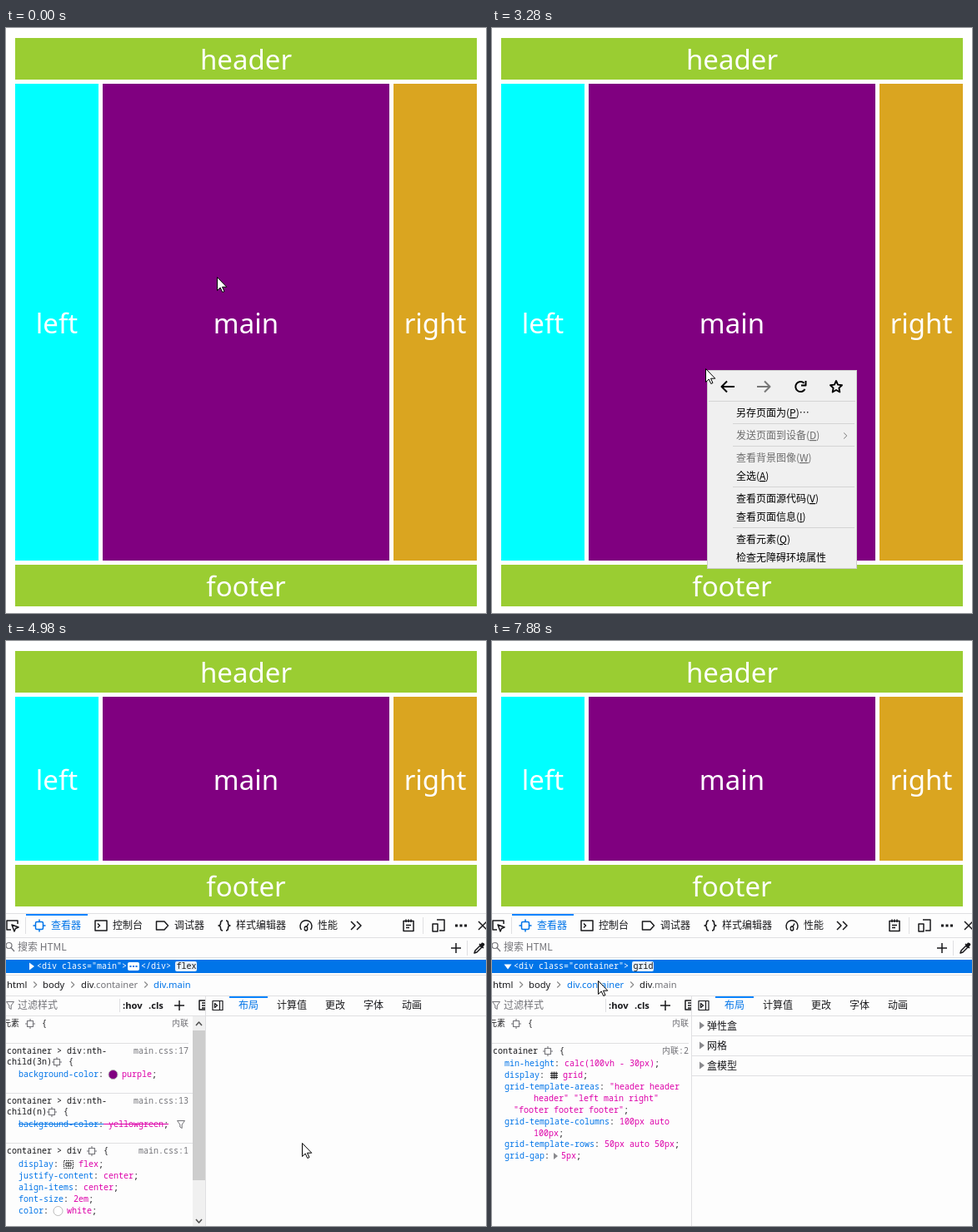
Write an HTML page that moves like this. It is 576 px wide and 703 px high and loops after 8 s.

```html
<!DOCTYPE html>
<html lang="zh-CN">
<head>
<meta charset="utf-8">
<title>Grid layout inspector</title>
<style>
html, body { margin: 0; width: 100%; height: 100%; overflow: hidden; background: #fff; }
svg { display: block; width: 100%; height: 100%; }
text { white-space: pre; font-family: "Noto Sans", "Noto Sans CJK SC", sans-serif; }
.big { font-size: 33px; fill: #fff; text-anchor: middle; }
.ui { font: 12px "Noto Sans CJK SC", "Noto Sans CJK", sans-serif; }
.sm { font-size: 11.2px; }
.mono { font: 10px "Noto Sans Mono", "Noto Sans CJK SC", monospace; }
.icon { fill: none; stroke-width: 1.5; stroke-linejoin: round; }
</style>
</head>
<body>
<svg id="stage" viewBox="0 0 576 703"></svg>
<script>
const INK = '#18181b', GREY = '#737378', BLUE = '#0074e8', PINK = '#dd00a9', EDGE = '#e0e0e2';
const LOOP = 8000, STEP = 120;

const rect = (x, y, w, h, fill, more = '') =>
  `<rect x="${x}" y="${y}" width="${w}" height="${h}" fill="${fill}" ${more}/>`;
const hline = (x, y, w, c = EDGE) => rect(x, y, w, 1, c);
const vline = (x, y, h, c = EDGE) => rect(x, y, 1, h, c);
const esc = s => s.replace(/&/g, '&amp;').replace(/</g, '&lt;').replace(/>/g, '&gt;');
const text = (x, y, s, cls = 'ui', fill = INK, more = '') =>
  `<text x="${x}" y="${y}" class="${cls}" fill="${fill}" ${more}>${esc(s)}</text>`;
const icon = (x, y, d, c = INK, more = '') =>
  `<path class="icon" transform="translate(${x} ${y})" d="${d}" stroke="${c}" ${more}/>`;
const solid = (x, y, d, c) => `<path transform="translate(${x} ${y})" d="${d}" fill="${c}"/>`;
const group = (id, body) => `<g id="${id}">${body}</g>`;

const PLUS = 'M-6 0H6M0-6V6';
const FUNNEL = 'M-4.5-4.5H4.5L1.2 0V4.5L-1.2 3V0Z';
const CHEVRON = 'M-1.8-3.5L1.8 0L-1.8 3.5';
const TARGET = 'M-3.5-3.5H3.5V3.5H-3.5ZM0-6V-3.5M0 3.5V6M-6 0H-3.5M3.5 0H6';
const RIGHT = 'M0-4.5L6 0L0 4.5Z', DOWN = 'M-4.5-2.5H4.5L0 3.5Z';
const INSPECT = 'M-3-4.5H3Q4.5-4.5 4.5-3V3Q4.5 4.5 3 4.5H-3Q-4.5 4.5-4.5 3V-3Q-4.5-4.5-3-4.5ZM0-7.5V-4.5M0 4.5V7.5M-7.5 0H-4.5M4.5 0H7.5';

// Grid page, fitted to a viewport of the given height
function page(height) {
  const mid = height - 130, bottom = height - 58;
  const cell = (x, y, w, h, fill, s) =>
    rect(x, y, w, h, fill) + text(x + w / 2, Math.round(y + h / 2 + 13), s, 'big', '#fff');
  return cell(11, 12, 554, 50, 'yellowgreen', 'header') +
    cell(11, 67, 100, mid, 'cyan', 'left') +
    cell(116, 67, 344, mid, 'purple', 'main') +
    cell(465, 67, 100, mid, 'goldenrod', 'right') +
    cell(11, bottom, 554, 50, 'yellowgreen', 'footer');
}

// Context menu: label, access key, row centre, disabled
const ITEMS = [
  ['另存页面为', 'P', 463], ['发送页面到设备', 'D', 490, 1], ['查看背景图像', 'W', 517, 1],
  ['全选', 'A', 539], ['查看页面源代码', 'V', 566], ['查看页面信息', 'I', 588],
  ['查看元素', 'Q', 615], ['检查无障碍环境属性', '', 637]
];

function menu() {
  const label = ([s, key, y, off], i) =>
    `<text x="293" y="${y + 4}" class="ui" fill="${off ? '#6d6d6d' : '#000'}">${s}` +
    (key ? `(<tspan text-decoration="underline">${key}</tspan>)` : '') + (i ? '' : '…') + '</text>';
  return rect(258.5, 411.5, 179, 238, '#f0f0f0', 'stroke="#ccc"') +
    rect(261, 0, 174, 22, '#91c9f7', 'id="hover"') +
    icon(283, 431, 'M8 0H-7M-1-6.5L-7.5 0L-1 6.5', '#000', 'style="stroke-width:2"') +
    icon(326, 431, 'M-8 0H7M1-6.5L7.5 0L1 6.5', '#777', 'style="stroke-width:2"') +
    icon(370, 431, 'M5.5 3A6 6 0 1 1 4.5-4.2M6.5-7V-1.5H1', '#000', 'style="stroke-width:2"') +
    icon(413, 431, 'M0-7L2.1-2.4L7-1.8L3.4 1.6L4.3 6.5L0 4L-4.3 6.5L-3.4 1.6L-7-1.8L-2.1-2.4Z', '#000', 'style="stroke-width:1.9"') +
    hline(260, 448, 176, '#d4d4d4') +
    [475, 502, 551, 600].map(y => hline(289, y, 146, '#d4d4d4')).join('') +
    ITEMS.map(label).join('') + icon(424, 490, CHEVRON, '#777', 'style="stroke-width:1"');
}

function toolbar() {
  return icon(8, 342, 'M-2 5H-7V-6H6V-2M-1-1L7 2L3.5 3.5L2 7Z') +
    vline(23, 332, 20) + rect(24, 328, 74, 2, '#0a84ff') +
    icon(40, 342, INSPECT, BLUE) + text(54, 346, '查看器', 'ui', BLUE) +
    icon(114, 342, 'M-7-6H7V6H-7ZM-4-2.5L-1.5 0L-4 2.5') + text(128, 346, '控制台') +
    icon(187, 342, 'M-6.5-5H3L7.5 0L3 5H-6.5Z') + text(202, 346, '调试器') +
    icon(262, 342, 'M-2-6Q-4.5-6-4.5-3Q-4.5 0-7 0Q-4.5 0-4.5 3Q-4.5 6-2 6M2-6Q4.5-6 4.5-3Q4.5 0 7 0Q4.5 0 4.5 3Q4.5 6 2 6') +
    text(276, 346, '样式编辑器') +
    icon(360, 342, 'M-5.5 5A7 7 0 1 1 5.5 5M-1.5 3.5A1.7 1.7 0 1 0 1.5 3.5A1.7 1.7 0 1 0-1.5 3.5M.5 2L3-2.5') +
    text(374, 346, '性能') +
    icon(420, 342, 'M-6-5L-1 0L-6 5M1-5L6 0L1 5') +
    icon(483, 342, 'M-6-5.5H6V6.5H-6ZM-3-7.5V-4M0-7.5V-4M3-7.5V-4M-3-.5H3M-3 2.5H1') +
    vline(500, 332, 20) +
    icon(519, 342, 'M-2-7H7V6H1M-7-2H-1V7H-7Z') +
    solid(546, 342, 'M-7-1.5h3v3h-3zM-1.5-1.5h3v3h-3zM4-1.5h3v3h-3z', INK) +
    icon(572, 342, 'M-5-5L5 5M5-5L-5 5') + hline(0, 356, 576);
}

function search() {
  return icon(4, 367, 'M-4-1A3.5 3.5 0 1 1 3-1A3.5 3.5 0 1 1-4-1M2 1.5L6 6', GREY, 'style="stroke-width:1.2"') +
    text(14, 372, '搜索 HTML', 'ui', GREY) + icon(540, 369, PLUS) +
    vline(553, 360, 18) + icon(568, 369, 'M-6 6L-5 3L1-3L3-1L-3 5ZM0-5L5 0') +
    solid(568, 369, 'M0-3L3-6.5Q6-7 6.5-4L3 0Z', INK) + hline(0, 380, 576);
}

const badge = (x, s) => rect(x, 385, 26, 12, '#e8f1fc', 'rx="2"') + text(x + 1.5, 394, s, 'mono', INK);

// Selected node row and breadcrumbs
function node(isMain) {
  const row = (x, s) => text(x, 394, s, 'mono', '#fff', 'font-weight="500"');
  const crumb = (x, s, on) => {
    const a = on ? BLUE : INK, b = on ? BLUE : GREY;
    return `<text x="${x}" y="417" class="sm" fill="${a}">div<tspan fill="${b}">${s}</tspan></text>`;
  };
  return rect(0, 383, 576, 16, '#0074e8') + (isMain
    ? solid(28, 391, RIGHT, '#fff') + row(37, '<div class="main">') +
      rect(146, 386, 14, 10, '#fff', 'rx="2"') +
      solid(153, 391, 'M-4.5-1h2v2h-2zM-1-1h2v2h-2zM2.5-1h2v2h-2z', BLUE) +
      row(162, '</div>') + badge(203, 'flex')
    : solid(19, 391, DOWN, '#fff') + row(26, '<div class="container">') + badge(168, 'grid')) +
    hline(0, 401, 576) + text(1, 417, 'html', 'sm') + text(44, 417, 'body', 'sm') +
    [35, 80, 168].map(x => icon(x, 413, CHEVRON, '#888', 'style="stroke-width:1.1"')).join('') +
    crumb(90, '.container', !isMain) + crumb(177, '.main', isMain) + hline(0, 426, 576);
}

function panes() {
  return icon(5, 438, FUNNEL, GREY, 'style="stroke-width:1"') + text(14, 442, '过滤样式', 'ui', GREY) +
    vline(136, 430, 16) + text(140, 442, ':hov', 'sm', INK, 'font-weight="600"') +
    text(171, 442, '.cls', 'sm', INK, 'font-weight="600"') +
    icon(208, 438, PLUS) + icon(236, 438, 'M3-6H-4V5H3M-1-3H3M-1 0H3M-1 3H3') +
    vline(239, 427, 276) + hline(0, 450, 576) +
    icon(254, 438, 'M-6-5.5H6V5.5H-6ZM2.5-5.5V5.5M-3.5-2.5L-.5 0L-3.5 2.5Z', INK, 'style="stroke-width:1.2"') +
    rect(268, 427, 46, 2, '#0a84ff') + text(279, 442, '布局', 'ui', BLUE) +
    text(325, 442, '计算值') + text(383, 442, '更改') + text(429, 442, '字体') + text(475, 442, '动画');
}

function accordion(first) {
  return [first, '网格', '盒模型'].map((s, i) => {
    const y = 462 + 24 * i;
    return solid(249, y, RIGHT, '#8a8a8e') + text(258, y + 5, s) + hline(240, y + 12, 336);
  }).join('');
}

const mono = (x, y, s, c = INK, more) => text(x, y, s, 'mono', c, more);
const open = (x, y) => icon(x, y - 3, TARGET, GREY, 'style="stroke-width:1.1"') + mono(x + 14, y, '{');
const from = (x, y, s) => mono(x, y, s, GREY, 'text-anchor="end"');
const value = (x, y, s) => {
  const end = s.endsWith(';');
  return mono(x, y, end ? s.slice(0, -1) : s, PINK) + (end ? mono(x + 6 * (s.length - 1), y, ';') : '');
};
const decl = (y, prop, val, x = 27 + 6 * prop.length) =>
  mono(15, y, prop, BLUE) + mono(15 + 6 * prop.length, y, ':') + value(x, y, val);
const swatch = (x, y, c) => `<circle cx="${x}" cy="${y}" r="5.5" fill="${c}" stroke="#bbb"/>`;
const inline = x => text(-4, 463, '元素', 'mono') + open(29, 463) + from(x, 463, '内联') + hline(0, 483, x);

function mainRules() {
  return inline(219) +
    mono(1, 496, 'container > div:nth-') + from(219, 496, 'main.css:17') +
    mono(1, 509, 'child(3n)') + open(61, 509) +
    decl(524, 'background-color', 'purple;', 139) + swatch(128.5, 521, 'purple') + hline(0, 543, 224) +
    mono(1, 556, 'container > div:nth-') + from(219, 556, 'main.css:13') +
    mono(1, 569, 'child(n)') + open(55, 569) +
    decl(584, 'background-color', 'yellowgreen;') + hline(15, 580, 180, PINK) + hline(15, 580, 102, BLUE) +
    icon(210, 581, FUNNEL, GREY, 'style="stroke-width:1"') + hline(0, 603, 224) +
    mono(1, 616, 'container > div') + from(219, 616, 'main.css:1') + open(103, 616) +
    decl(632, 'display', 'flex;', 87) +
    icon(75, 629, 'M-5.5-4.5H5.5V4.5H-5.5Z', INK, 'stroke-dasharray="1.5 1" style="stroke-width:1"') +
    icon(75, 629, 'M-3-2H3V2H-3ZM0-2V2', INK, 'style="stroke-width:1"') +
    decl(646, 'justify-content', 'center;') + decl(660, 'align-items', 'center;') +
    decl(674, 'font-size', '2em;') + decl(688, 'color', 'white;', 73) + swatch(62.5, 685, '#fff') +
    rect(224, 451, 15, 252, '#f0f0f0') + rect(224, 468, 15, 180, '#cdcdcd') +
    icon(231.5, 460, 'M-3.5 2L0-2L3.5 2', '#505050') + icon(231.5, 697, 'M-3.5-2L0 2L3.5-2', '#505050');
}

function containerRules() {
  return inline(236) +
    mono(1, 496, 'container') + open(67, 496) + from(236, 496, '内联:2') +
    decl(511, 'min-height', 'calc(100vh - 30px);') + decl(525, 'display', 'grid;', 85) +
    icon(74.5, 522, 'M-2.5-4.5V4.5M0-4.5V4.5M2.5-4.5V4.5M-4.5-2.5H4.5M-4.5 0H4.5M-4.5 2.5H4.5', INK, 'style="stroke-width:1"') +
    decl(539, 'grid-template-areas', '"header header') +
    value(50, 553, 'header" "left main right"') + value(26, 567, '"footer footer footer";') +
    decl(581, 'grid-template-columns', '100px auto') + value(50, 595, '100px;') +
    decl(608, 'grid-template-rows', '50px auto 50px;') +
    decl(622, 'grid-gap', '5px;', 83) + solid(74, 619, 'M0-4L5 0L0 4Z', '#8a8a8e');
}

function highlight() {
  const guides = '<path d="M10.5 0V327M564.5 0V327M0 11.5H576M0 316.5H576" fill="none" stroke="#08c" stroke-dasharray="5 3"/>';
  return rect(11, 12, 554, 306, 'rgb(135,206,235)', 'opacity=".6"') + guides +
    rect(216, -5, 144, 25, '#353b45', 'rx="3"') +
    '<text x="221" y="11" class="sm" fill="#d080ff">div<tspan fill="#5cb8f5">.container</tspan></text>' +
    vline(296, 1, 13, '#6a707a') + text(302, 11, '554 × 306', 'sm', '#dcdce4');
}

// Pointer moves: start, number of steps, target
const MOVES = [
  [1150, 2, 228, 130], [1410, 1, 264, 61], [1550, 1, 280, 40], [1690, 2, 383, 110],
  [1930, 1, 354, 131], [2070, 5, 267, 615], [2670, 1, 269, 570], [2790, 1, 271, 475],
  [2910, 2, 256, 409], [3530, 6, 358, 612], [4980, 1, 355, 603], [5220, 1, 354, 601],
  [5600, 4, 138, 433], [6080, 1, 120, 409], [7760, 2, 127, 408]
];

function pointer(t) {
  let x = 253, y = 299;
  for (const [start, n, tx, ty] of MOVES) {
    if (t < start) break;
    const p = Math.min(1, (Math.floor((t - start) / STEP) + 1) / n);
    x += (tx - x) * p;
    y += (ty - y) * p;
  }
  return [Math.round(x), Math.round(y)];
}

// Visible span of each layer
const LAYERS = [
  ['tall', 0, 4380, page(703)],
  ['short', 4380, LOOP, page(327) + rect(0, 327, 576, 376, '#fdfdfd') + hline(0, 327, 576)],
  ['toolbar', 4500, LOOP, toolbar()],
  ['search', 4620, LOOP, search()],
  ['panes', 4860, LOOP, panes()],
  ['nodeMain', 4860, 6730, node(true)],
  ['nodeBox', 6730, LOOP, node(false)],
  ['rulesMain', 4980, 6730, mainRules()],
  ['rulesBox', 6730, LOOP, containerRules()],
  ['foldMain', 5100, 6730, accordion('弹性容器')],
  ['foldBox', 6730, LOOP, accordion('弹性盒')],
  ['highlight', 6080, 7760, highlight()],
  ['menu', 3280, 4380, menu()]
];

const stage = document.getElementById('stage');
stage.innerHTML = LAYERS.map(([id, , , body]) => group(id, body)).join('') +
  group('arrow', '<path d="M.5.5V16.5L4.2 13L6.8 18.5L9 17.5L6.5 12.2H11.8Z" fill="#fff" stroke="#000"/>') +
  group('beam', '<path d="M-3-8.5H-1L0-7.5L1-8.5H3M0-7.5V7.5M-3 8.5H-1L0 7.5L1 8.5H3" fill="none" stroke="#fff"/>');

const el = id => document.getElementById(id);
const show = (id, on) => el(id).setAttribute('display', on ? 'inline' : 'none');

function render(t) {
  for (const [id, start, end] of LAYERS) show(id, t >= start && t < end);

  const [x, y] = pointer(t);
  const overText = t < 3280 && x > 235 && x < 341 && y > 20 && y < 54;
  show('arrow', !overText);
  show('beam', overText);
  for (const id of ['arrow', 'beam']) el(id).setAttribute('transform', `translate(${x} ${y})`);

  const item = ITEMS.find(([, , c, off]) => !off && Math.abs(y - c) <= 11);
  show('hover', item && x > 261);
  if (item) el('hover').setAttribute('y', item[2] - 11);
}

function tick() {
  render(performance.now() % LOOP);
  requestAnimationFrame(tick);
}
tick();
</script>
</body>
</html>
```
